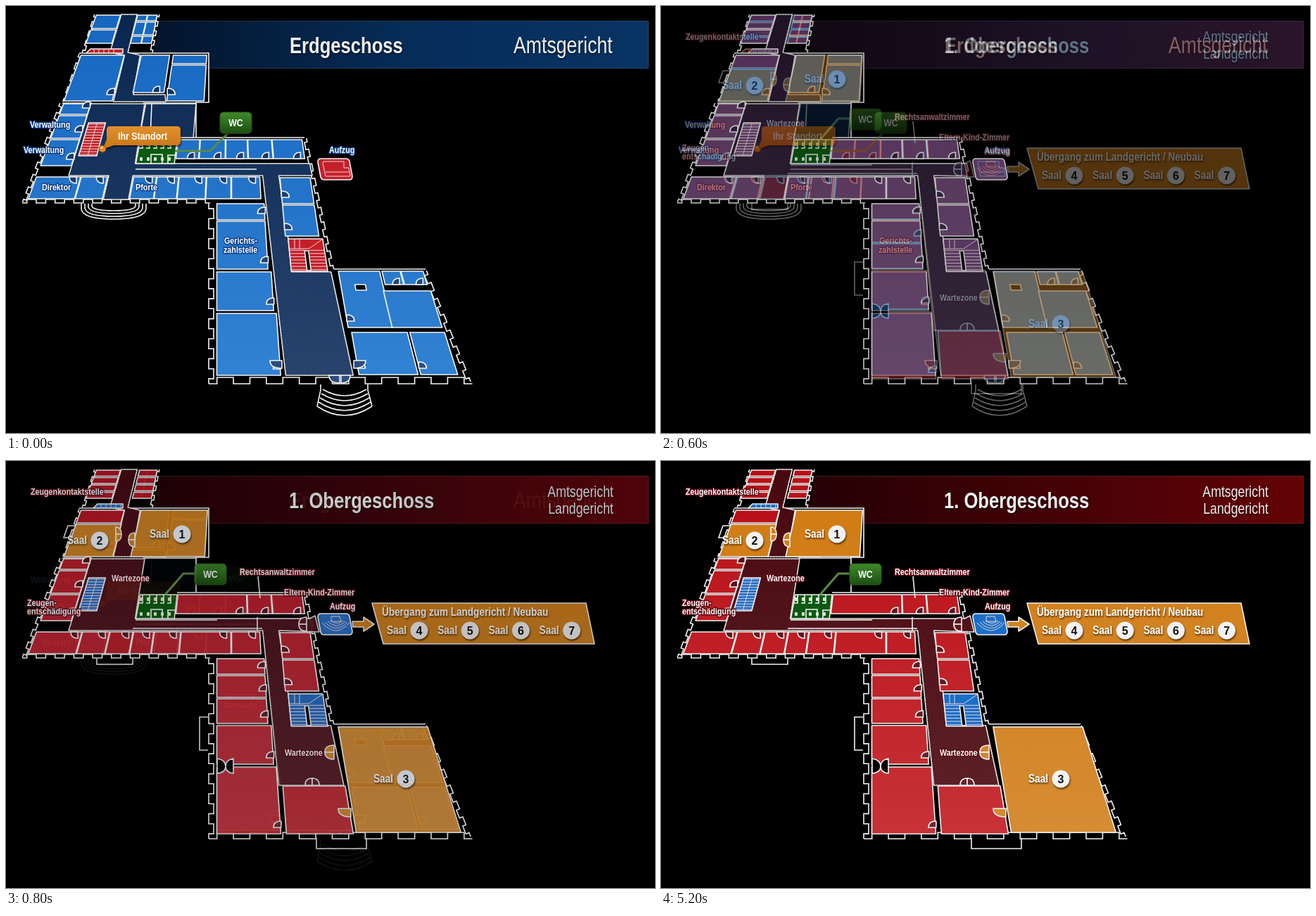
An HTML page that plays this animation: 922 px wide and 607 px high, repeating every 8 s.

```html
<!DOCTYPE html>
<html lang="de">
<head>
<meta charset="utf-8">
<title>Etagenplan</title>
<style>
html, body { margin: 0; width: 100%; height: 100%; overflow: hidden; background: #000; }
svg { display: block; width: 922px; height: 607px; }
text { font-family: "Liberation Sans", Arial, sans-serif; font-weight: bold; fill: #fff; }
.room, .door, .hall, .stair, .saal, .wc, .gap { stroke: #f4f4f4; stroke-width: 1.6; stroke-linejoin: round; }
.line { fill: none; stroke: #f4f4f4; stroke-width: 1.6; }
.thin { fill: none; stroke: #e8d4d4; stroke-width: 1; }
.hatch { fill: url(#hatch); }
.gap { fill: #000; }
.wc { fill: #0b5a12; }
.saal { fill: url(#orange); }
.label text { paint-order: stroke; stroke-width: 3px; stroke-linejoin: round; }
.title { fill: #f0f0f0; filter: drop-shadow(1px 2px 1px #0008); }
.light { font-weight: normal; }
.shade { filter: drop-shadow(1px 2px 1px #0009); }
#ground .room { fill: url(#blue); }
#ground .hall, #ground .door { fill: url(#navy); }
#ground .stair { fill: #c5202a; }
#ground .label text { stroke: #0c3f86; }
#upper .room { fill: url(#red); }
#upper .hall, #upper .door { fill: url(#wine); }
#upper .stair { fill: #1a6fc9; }
#upper .label text { stroke: #5c0a12; }
#ground { animation: leave 8s infinite; }
#upper { animation: enter 8s step-end infinite; }
@keyframes leave {
  0% { opacity: 1; animation-timing-function: step-end; }
  6.25% { opacity: 1; animation-timing-function: steps(6, jump-start); }
  13.75%, 100% { opacity: 0; }
}
@keyframes enter {
  0% { opacity: 0; }
  6.25% { opacity: .2; }
  7.5% { opacity: .4; }
  8.75% { opacity: .6; }
  10% { opacity: .8; }
  11.25% { opacity: .92; }
  12.5%, 100% { opacity: 1; }
}
</style>
</head>
<body>
<svg id="stage" viewBox="0 0 922 607"></svg>
<script>
const NARROW = 0.826; // condensed face

// One-point perspective: u is the x position on the line y = 280.
// The west wall of the south wing runs straight down.
const VX = 320, VY = -505;
const X = (u, y) => u < VX && y > 280 ? u : VX + (u - VX) * (y - VY) / (280 - VY);

const path = (d, cls = 'line') => `<path d="${d}" class="${cls}"/>`;
const poly = (points, cls) => `<polygon points="${points}" class="${cls}"/>`;
const plan = points => points.split(' ').map(p => {
  const [u, y] = p.split(',').map(Number);
  return `${X(u, y).toFixed(1)},${y}`;
}).join(' ');
const area = (points, cls) => poly(plan(points), cls);
const quad = (u1, y1, u2, y2, cls) => area(`${u1},${y1} ${u2},${y1} ${u2},${y2} ${u1},${y2}`, cls);
const hall = points => area(points, 'hall') + area(points, 'hatch');
const repeat = (n, draw) => Array.from({ length: n }, (_, i) => draw(i)).join('');

const text = (x, y, size, str, cls = '', anchor = 'start') =>
  `<text transform="translate(${x} ${y}) scale(${NARROW} 1)" font-size="${size}" class="${cls}" text-anchor="${anchor}">${str}</text>`;
const labels = list => `<g class="label">${list.map(([x, y, s]) => text(x, y, 13, s)).join('')}</g>`;

const gradient = (id, colors, attrs) => `<linearGradient id="${id}" ${attrs}>` +
  colors.map((c, i) => `<stop offset="${i / (colors.length - 1)}" stop-color="${c}"/>`).join('') + '</linearGradient>';
const ramp = (id, ...colors) => gradient(id, colors, 'gradientUnits="userSpaceOnUse" x1="0" y1="0" x2="0" y2="560"');
const bar = (id, ...colors) => gradient(id, colors, '');
const sheen = (id, ...colors) => gradient(id, colors, 'x2="0" y2="1"');

const leaf = (x, y, w, h, cls = 'door') => path(`M${x},${y}h${w}q0,${h} ${-w},${h}z`, cls);

// Rooms between the given wall lines, each with a door on one side
function rooms(us, ys, side) {
  let walls = '', doors = '';
  for (let j = 1; j < ys.length; j++) {
    for (let i = 1; i < us.length; i++) {
      const top = ys[j - 1] + 1, end = ys[j] - 1, east = us[i] - .5;
      walls += quad(us[i - 1] + .5, top, east, end, 'room');
      if (side === 'N') doors += leaf(X(east, top) - 6, top, -10, 9);
      if (side === 'S') doors += leaf(X(east, end) - 6, end, -10, -9);
      if (side === 'E') doors += leaf(X(east, end - 9) + 1, end - 9, -11, -9);
      if (side === 'W') doors += leaf(X(us[i - 1], end - 9), end - 9, 11, -9);
    }
  }
  return walls + doors;
}

// Outer wall with n window niches of depth d on its right-hand side
function wall(u1, y1, u2, y2, n, d) {
  const x1 = X(u1, y1), dx = X(u2, y2) - x1, dy = y2 - y1, len = Math.hypot(dx, dy);
  const at = (t, k) => `${(x1 + dx * t - dy / len * k).toFixed(1)},${(y1 + dy * t + dx / len * k).toFixed(1)} `;
  return path('M' + at(0, 0) +
    repeat(n, i => 'L' + at((i + .25) / n, 0) + at((i + .25) / n, d) + at((i + .75) / n, d) + at((i + .75) / n, 0)) +
    'L' + at(1, 0));
}

const treads = (u1, u2, y1, y2, n) => path(repeat(n, i => {
  const y = y1 + (y2 - y1) * (i + .5) / n;
  return `M${X(u1, y)},${y}H${X(u2, y)}`;
}), 'thin');

const stairs = () =>
  quad(83, 166, 111, 213, 'stair') + treads(83, 111, 166, 213, 12) +
  path(`M${plan('97,166')}L${plan('97,213')}`, 'thin') +
  quad(396, 331, 442, 377, 'stair') + treads(396, 416, 345, 377, 7) + treads(422, 442, 345, 377, 7) +
  path('M403,345H430L449,332M410,331V345M417,331V345', 'thin') +
  quad(416, 348, 421, 376, 'gap');

const slope = left =>
  poly(`${left},67 ${left + 6},61 166,61 166,67`, 'stair') +
  path(repeat(5, i => `M${left + 11 + 7 * i},61v6`), 'thin');

const toilets = () => quad(174, 190, 233, 224, 'wc') +
  path(repeat(5, i => `M${194 + 10 * i},190v12h-5`) + 'M206,224V211H222V224M230,224V212H241') +
  repeat(10, i => `<rect x="${190 + i % 5 * 10}" y="${i < 5 ? 194 : 215}" width="4" height="5" rx="1" fill="#dfe9da"/>`);

const tag = (x, y, line) =>
  `<path d="${line}" fill="none" stroke="#5d8a45" stroke-width="3"/>
   <rect x="${x}" y="${y}" width="45" height="30" rx="5" fill="url(#green)" stroke="#2d5a20" class="shade"/>` +
  text(x + 22.5, y + 20, 15, 'WC', '', 'middle');

const lift = () => path('M447,217H483Q487,217 488,221L492,242Q492,247 488,247H452Q448,247 447,243L443,222Q443,217 447,217Z', 'stair');

const shell = () =>
  poly('126,12 219,12 209,67 288,67 288,138 274,139 274,187 424,187 466,374 596,374 660,538 286,538 286,281 17,281', 'black') +
  wall(25, 12, 29, 66, 4, -3) + wall(24, 68, 27, 136, 4, -3) + wall(23, 138, 23, 279, 8, -4) +
  wall(165, 12, 166, 66, 4, 3) + wall(441, 188, 450, 374, 9, 4) + wall(567, 376, 577, 534, 7, 5) +
  wall(23, 280, 290, 280, 10, -5) + wall(288, 281, 288, 537, 9, -7) + wall(288, 537, 578, 537, 8, -9) +
  path('M104,67H288V137H270V187M80,138H122M195,138H270M243,187H424M466,374H596');

const header = fill =>
  `<rect x="205" y="21" width="708" height="68" fill="url(#${fill})"/>
   <path d="M205,21.5H912.5V88.5H280" fill="none" stroke="#fff" stroke-opacity=".1"/>`;

const entrance = () => path(
  repeat(4, i => {
    const r = 46 - 5 * i, h = 22 - 4 * i;
    return `M${153 - r},281v${h * .35}q2,${h * .65} ${r},${h * .65}q${r - 2},0 ${r},${-h * .65}v${-h * .35}`;
  }) +
  repeat(5, i => {
    const r = 39 - 2 * i;
    return `M${481 - r},${569 - 6 * i}q${r},${26 - 2 * i} ${2 * r},0`;
  }) + 'M447,538V546L442,569M514,538V546L520,569');

const wingHall = () => hall('83,12 117,12 118,66 143,70 147,126 203,126 206,136 115,136 113,70 83,66');

// Rooms that both floors share
const common = () =>
  rooms([29, 77], [138, 155, 189, 228], 'E') +
  rooms([392, 438], [243, 282, 328], 'W');

function groundFloor() {
  return header('barBlue') + shell() + entrance() + wingHall() +
    hall('172,139 259,139 259,187 172,187') +
    hall('77,139 170,139 173,224 440,224 441,241 391,241 396,330 396,378 446,378 452,525 379,525 367,241 173,241 173,275 137,275 137,241 77,241') +
    path('M207,139L205,187M184,232H356') +
    common() +
    rooms([29, 82], [12, 33, 54]) + rooms([118, 140, 161], [12, 22, 42, 54]) +
    rooms([28, 113], [69, 136], 'E') + rooms([145, 201], [69, 124], 'S') +
    rooms([207, 273], [69, 83]) + rooms([207, 273], [83, 136], 'W') +
    rooms([29, 96, 136], [242, 275], 'N') + rooms([174, 209, 242, 283, 320, 363], [242, 275], 'N') +
    rooms([234, 270, 311, 346, 385, 434], [189, 218], 'S') +
    rooms([299, 367], [280, 305, 375], 'E') + rooms([299, 371], [377, 434], 'E') + rooms([299, 374], [436, 526], 'E') +
    rooms([455, 508], [376, 458], 'W') + rooms([510, 534, 563], [376, 397], 'S') + rooms([506, 565], [404, 458]) +
    rooms([458, 523], [463, 525], 'W') + rooms([525, 566], [463, 525], 'W') +
    quad(473, 396, 486, 404, 'gap') +
    leaf(392, 504, -17, 11) + leaf(494, 504, 17, 11) + leaf(474, 525, -15, 11) + leaf(476, 525, 13, 11) +
    stairs() + slope(114) + toilets() + lift() +
    path('M451,221H480V230H487L489,242H454L450,224ZM454,236H488', 'thin') +
    tag(304, 151, 'M316,180L290,206H240') +
    `<path d="M148,171H243Q248,171 248,176V193Q248,198 243,198H153L137,204L143,190V176Q143,171 148,171Z" fill="url(#amber)" class="shade"/>
     <circle cx="137" cy="203" r="5" fill="#e08a20" stroke="#8a4c08"/><circle cx="136" cy="201.5" r="1.8" fill="#ffd9a0"/>` +
    text(159, 190, 15, 'Ihr Standort') +
    labels([[34, 173, 'Verwaltung'], [25, 209, 'Verwaltung'], [51, 262, 'Direktor'], [184, 262, 'Pforte'],
      [310, 338, 'Gerichts-'], [309, 351, 'zahlstelle'], [459, 209, 'Aufzug']]) +
    text(403, 67, 31, 'Erdgeschoss', 'title') + text(721, 67, 32.3, 'Amtsgericht', 'title light');
}

const saal = (x, y, n) => text(x, y, 16.5, 'Saal', 'shade') +
  `<circle cx="${x + 46}" cy="${y - 5}" r="12.5" fill="#f2f2f2" class="shade"/>
   <text x="${x + 46}" y="${y + 1}" font-size="16" text-anchor="middle" style="fill:#111">${n}</text>`;

function upperFloor() {
  const attic = [12, 22.5, 33, 43.5, 54];
  return '<rect width="922" height="607"/>' + header('barRed') + shell() +
    path('M129,281V289H180V281M441,536V551H512V536M287,364H275V411H287M98,92H88L82,109H92') + wingHall() +
    hall('77,139 170,139 173,224 440,224 449,220 451,243 391,241 396,330 396,376 446,376 450,461 375,461 367,241 77,241') +
    path('M184,226H300M180,238H364M357,222V241') +
    common() +
    rooms([29, 82], attic) + rooms([122, 161], attic) + rooms([28, 113], [69, 89]) +
    rooms([29, 98, 139, 174, 205, 245, 320, 363], [242, 275], 'N') +
    rooms([234, 345, 384, 434], [189, 218], 'S') +
    rooms([299, 367], [280, 304, 337, 374], 'E') + rooms([299, 371], [375, 432], 'E') +
    rooms([299, 374], [434, 531], 'E') + rooms([379, 452], [461, 531]) +
    quad(29, 90, 114, 136, 'saal') + quad(145, 70, 274, 136, 'saal') + quad(455, 378, 568, 528, 'saal') +
    [-10, 10].map(h => leaf(466, 414, -13, h, 'saal') + leaf(183, 112, -9, h, 'saal') +
      leaf(156, 104, 8, h, 'saal') + leaf(427, 232, -11, h) + leaf(435, 461, h, -10)).join('') +
    leaf(490, 494, -18, 12, 'saal') +
    path('M300,423Q312,425 312,434Q312,443 300,444ZM323,423Q312,425 312,434Q312,443 323,444Z', 'gap') +
    stairs() + slope(124) + toilets() + lift() +
    path(repeat(4, i => `M${449 + 4 * i},${230 - i}q${20 - 3.5 * i},${22 - 5 * i} ${39 - 7 * i},0`) + 'M462,221H474L476,228H462Z', 'thin') +
    path('M492,228H508V222L523,232L508,242V236H493Z', 'saal') +
    poly('520,202 824,202 836,260 536,260', 'saal') +
    text(534, 220, 16.4, 'Übergang zum Landgericht / Neubau', 'shade') +
    repeat(4, i => saal(541 + 72.2 * i, 246, i + 4)) +
    saal(204, 109, 1) + saal(87, 118, 2) + saal(522, 457, 3) +
    tag(268, 146, 'M268,160H252L226,190') +
    path('M358,164L361,195') +
    labels([[35, 48, 'Zeugenkontaktstelle'], [150, 171, 'Wartezone'], [30, 206, 'Zeugen-'], [30, 218, 'entschädigung'],
      [332, 162, 'Rechtsanwaltzimmer'], [395, 191, 'Eltern-Kind-Zimmer'], [460, 211, 'Aufzug'], [396, 419, 'Wartezone']]) +
    text(402, 67, 31, '1. Obergeschoss', 'title') +
    text(863, 51, 21.5, 'Amtsgericht', 'title light', 'end') + text(863, 75, 21.5, 'Landgericht', 'title light', 'end');
}

document.getElementById('stage').innerHTML = `<defs>
  ${ramp('blue', '#1566c0', '#3384d4')}${ramp('red', '#b80c14', '#c8343a')}
  ${ramp('navy', '#0a2c5c', '#30507f')}${ramp('wine', '#520810', '#6d2a33')}
  ${ramp('orange', '#d07a10', '#d68d36')}
  ${bar('barBlue', '#03142a', '#062c58', '#083463')}${bar('barRed', '#240004', '#440206', '#640206')}
  ${sheen('green', '#3f8a2a', '#1c4f12')}${sheen('amber', '#e2902c', '#c87414')}
  <pattern id="hatch" width="3" height="3" patternUnits="userSpaceOnUse" patternTransform="rotate(-45)">
    <rect width="3" height="1.2" opacity=".32"/></pattern>
</defs>
<g id="ground">${groundFloor()}</g><g id="upper">${upperFloor()}</g>`;
</script>
</body>
</html>
```
